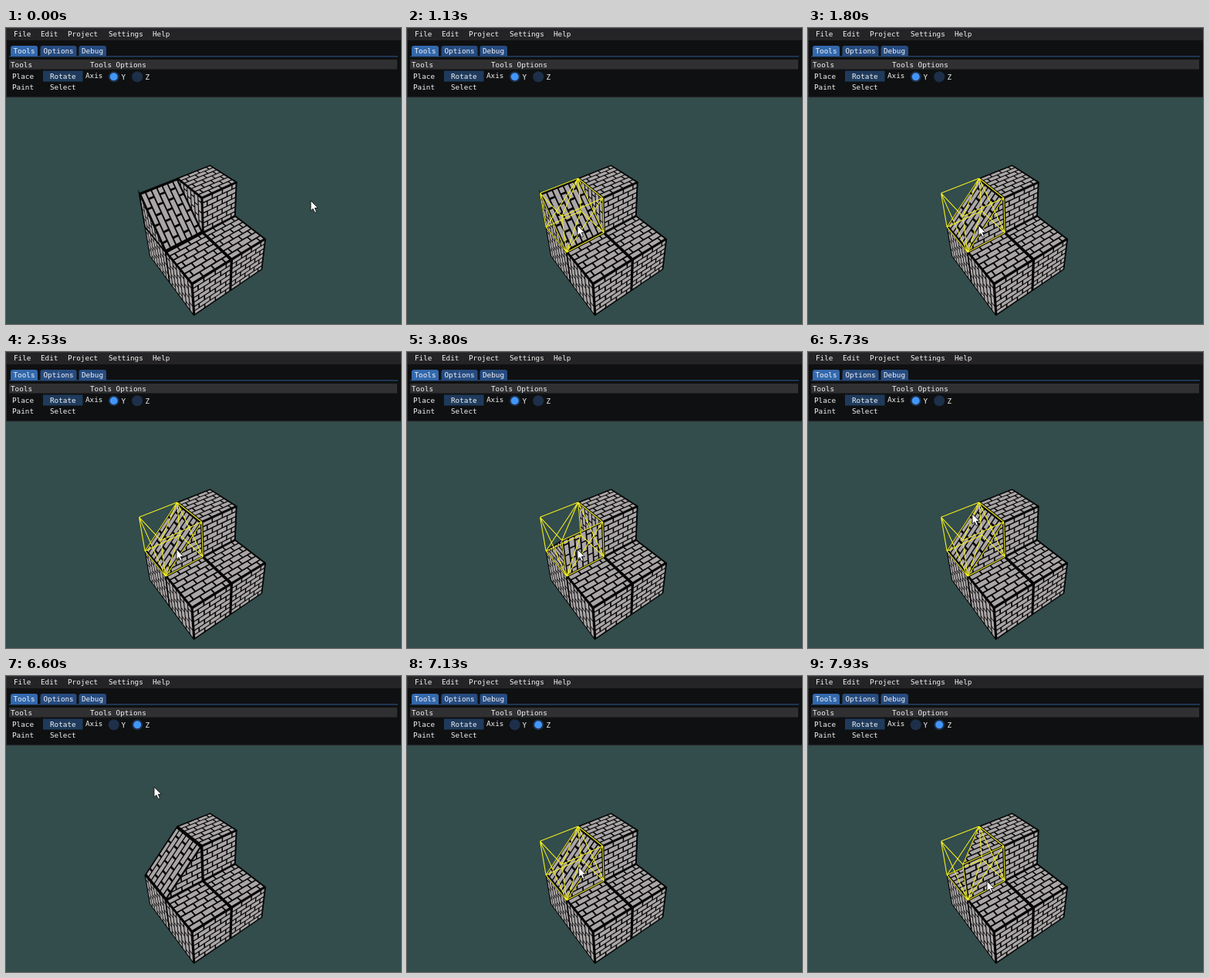
Recreate the animation shown at these times as an HTML page with a canvas. Size 512 by 384 pixels, loop 8 s.

```html
<!DOCTYPE html>
<html lang="en">
<head>
<meta charset="utf-8">
<title>Block editor</title>
<style>
  html, body { margin: 0; width: 100%; height: 100%; overflow: hidden; background: #334c4c; }
  canvas, svg { position: absolute; left: 0; top: 0; width: 512px; height: 384px; }
  text { font: 9.3px "DejaVu Sans Mono", "Liberation Mono", monospace; fill: #f4f4f4; white-space: pre; }
</style>
</head>
<body>
<canvas id="scene" width="512" height="384"></canvas>
<svg viewBox="0 0 512 384">
  <rect width="512" height="90" fill="#0f1011"/>
  <rect width="512" height="16" fill="#242325"/>
  <path d="M.5 90V.5H512M0 89.8H512" fill="none" stroke="#36373c" stroke-width=".8"/>
  <text x="10" y="11">File</text>
  <text x="45" y="11">Edit</text>
  <text x="80" y="11">Project</text>
  <text x="133" y="11">Settings</text>
  <text x="190" y="11">Help</text>

  <path d="M6 37V26q0-3 3-3H38q3 0 3 3V37Z" fill="#3369ad"/>
  <path d="M44.5 36.5V26q0-3 3-3H88.5q3 0 3 3V36.5ZM94.5 36.5V26q0-3 3-3H127q3 0 3 3V36.5Z" fill="#264b80"/>
  <rect x="4" y="36.4" width="504" height="1" fill="#2c5a95"/>
  <text x="9.5" y="33">Tools</text>
  <text x="48.5" y="33">Options</text>
  <text x="98" y="33">Debug</text>

  <rect x="4" y="41" width="503" height="12.5" fill="#303033"/>
  <text x="6" y="51">Tools</text>
  <text x="109" y="51">Tools Options</text>

  <rect x="48" y="55.5" width="51.5" height="14" fill="#1f3a5c"/>
  <text x="8" y="66">Place</text>
  <text x="57" y="66">Rotate</text>
  <text x="8" y="80">Paint</text>
  <text x="57" y="80">Select</text>
  <text x="103" y="65">Axis</text>
  <g fill="#1d2f49"><circle cx="139.7" cy="63.3" r="7"/><circle cx="170.2" cy="63.3" r="7"/></g>
  <circle id="dot" cx="139.7" cy="63.3" r="5" fill="#4296fa"/>
  <text x="149.5" y="67">Y</text>
  <text x="180.5" y="67">Z</text>

  <path id="cursor" d="M0 0V13.2L3 10.5 5.2 15.4 7.5 14.4 5.3 9.6H9.4Z" fill="#fff" stroke="#111" stroke-width=".9"/>
</svg>
<script>
const LOOP = 8000;
const ctx = document.getElementById('scene').getContext('2d');
const dot = document.getElementById('dot');
const cursor = document.getElementById('cursor');

const add = (p, a, s, b, t) => p.map((c, i) => c + a[i] * s + b[i] * t);

// Perspective projection around the corner shared by all the blocks.
function project([u, v, w]) {
  const depth = 1 - .11 * u + .07 * v - .078 * w;
  return [
    255.2 + (33.1 * u + 45 * v - 1.4 * w) / depth,
    265.6 + (31.3 * u - 23.6 * v - 41.6 * w) / depth
  ];
}

function trace(points) {
  points.forEach((p, i) => {
    const [x, y] = project(p);
    i ? ctx.lineTo(x, y) : ctx.moveTo(x, y);
  });
  ctx.closePath();
}

const SQUARE = [[0, 0], [1, 0], [1, 1], [0, 1]];
const TRIANGLE = [[0, 0], [0, 1], [1, 1]];
const ROWS = 7, COLS = 3.5, GAP = .017, EDGE = .036;

// A brick face: bricks lie along a, rows stack along b.
function face(o, a, b, shape = SQUARE) {
  const at = (s, t) => add(o, a, s, b, t);
  const [p, q, r] = [at(0, 0), at(1, 0), at(0, 1)].map(project);
  if ((q[0] - p[0]) * (r[1] - p[1]) - (q[1] - p[1]) * (r[0] - p[0]) >= 0) return;

  const outline = shape.map(c => at(...c));
  ctx.save();
  ctx.beginPath();
  trace(outline);
  ctx.fillStyle = ctx.strokeStyle = '#050505';
  ctx.lineWidth = 1;
  ctx.lineJoin = 'round';
  ctx.fill();
  ctx.stroke();
  ctx.clip();

  const inside = x => Math.min(1 - EDGE, Math.max(EDGE, x));
  ctx.beginPath();
  for (let row = 0; row < ROWS; row++) {
    const t0 = inside(row / ROWS + GAP), t1 = inside((row + 1) / ROWS - GAP);
    const shift = row % 2 / 2;
    for (let i = 0; i <= COLS + shift; i++) {
      const s0 = inside((i - shift) / COLS + GAP), s1 = inside((i + 1 - shift) / COLS - GAP);
      if (s1 > s0) trace([at(s0, t0), at(s1, t0), at(s1, t1), at(s0, t1)]);
    }
  }
  ctx.fillStyle = '#aaa5a6';
  ctx.fill();
  ctx.restore();
  if (shape === TRIANGLE) {
    ctx.beginPath();
    trace(outline);
    ctx.lineWidth = 1.4;
    ctx.strokeStyle = '#050505';
    ctx.stroke();
  }
}

// The three sides of a unit cube that face the viewer: top, front, left.
function block(u, v, w) {
  face([u, v - 1, w], [0, 1, 0], [-1, 0, 0]);
  face([u, v - 1, w - 1], [0, 1, 0], [0, 0, 1]);
  face([u, v - 1, w - 1], [0, 0, 1], [-1, 0, 0]);
}

const H = .5;
const WEDGE = [
  [[-H, H, -H], [1, 0, 0], [0, -1, 0]],
  [[-H, -H, -H], [0, 0, 1], [0, 1, 0]],
  [[-H, -H, H], [1, 0, -1], [0, 1, 0]],
  [[H, -H, -H], [0, 0, 1], [-1, 0, 0], TRIANGLE],
  [[-H, H, H], [1, 0, 0], [0, 0, -1], TRIANGLE]
];
const turnY = ([u, v, w]) => [v, -u, w];
const turnZ = ([u, v, w]) => [-w, v, u];
const TURNS = [[1800, turnY], [3400, turnY], [4000, turnY], [4600, turnY], [5130, turnY], [7330, turnZ]];

function wedge(time) {
  const turns = TURNS.filter(([start]) => time >= start);
  const spin = p => turns.reduce((q, [, turn]) => turn(q), p);
  for (const [o, a, b, shape] of WEDGE) {
    face(add(spin(o), [-H, -H, H], 1, [0, 0, 0], 0), spin(a), spin(b), shape);
  }
}

// Corner bits: 1 = u, 2 = v, 4 = w. Edges first, then one diagonal per side.
const WIRES = ['01', '23', '45', '67', '02', '13', '46', '57', '04', '15', '26', '37',
  '06', '14', '17', '36', '56', '12'];

function highlight(u, v, w) {
  const corner = n => project([u - 1 + (n & 1), v - 1 + (n >> 1 & 1), w - 1 + (n >> 2)]);
  ctx.beginPath();
  for (const wire of WIRES) {
    ctx.moveTo(...corner(+wire[0]));
    ctx.lineTo(...corner(+wire[1]));
  }
  ctx.strokeStyle = '#f0ec1e';
  ctx.lineWidth = 1.1;
  ctx.stroke();
}

// Time spans in which a block is under the pointer.
const HOVERS = [
  [790, 990, 1, 1, 0],
  [990, 1050, 1, 0, 0],
  [1050, 5790, 0, 0, 1],
  [6790, LOOP, 0, 0, 1]
];

// Pointer stops: time, x, y.
const PATH = [
  [0, 395, 224], [400, 395, 224], [600, 368, 238], [800, 318, 264], [933, 280, 268],
  [1067, 236, 259], [1133, 221, 256], [5667, 221, 256], [5733, 213, 210], [5867, 197, 150],
  [6067, 177, 82], [6200, 169, 63], [6400, 169, 63], [6533, 183, 110], [6600, 192, 144],
  [6800, 211, 212], [7000, 222, 246], [7400, 224, 252], [7933, 232, 266], [LOOP, 232, 266]
];

function pointer(time) {
  const i = PATH.findIndex(stop => stop[0] > time);
  const [t0, x0, y0] = PATH[i - 1], [t1, x1, y1] = PATH[i];
  const k = (time - t0) / (t1 - t0);
  return [x0 + (x1 - x0) * k, y0 + (y1 - y0) * k];
}

function draw(now) {
  // The picture advances fifteen times a second.
  const time = Math.floor((now % LOOP + 4) * .015) / .015 % LOOP;
  ctx.fillStyle = '#334c4c';
  ctx.fillRect(0, 0, 512, 384);

  for (const u of [0, 1]) for (const v of [1, 0]) block(u, v, 0);
  block(0, 1, 1);
  wedge(time);
  for (const [from, to, ...cell] of HOVERS) {
    if (time >= from && time < to) highlight(...cell);
  }

  dot.setAttribute('cx', time < 6260 ? 139.7 : 170.2);
  cursor.setAttribute('transform', `translate(${pointer(time).map(c => c.toFixed(2))})`);
  requestAnimationFrame(draw);
}
requestAnimationFrame(draw);
</script>
</body>
</html>
```
